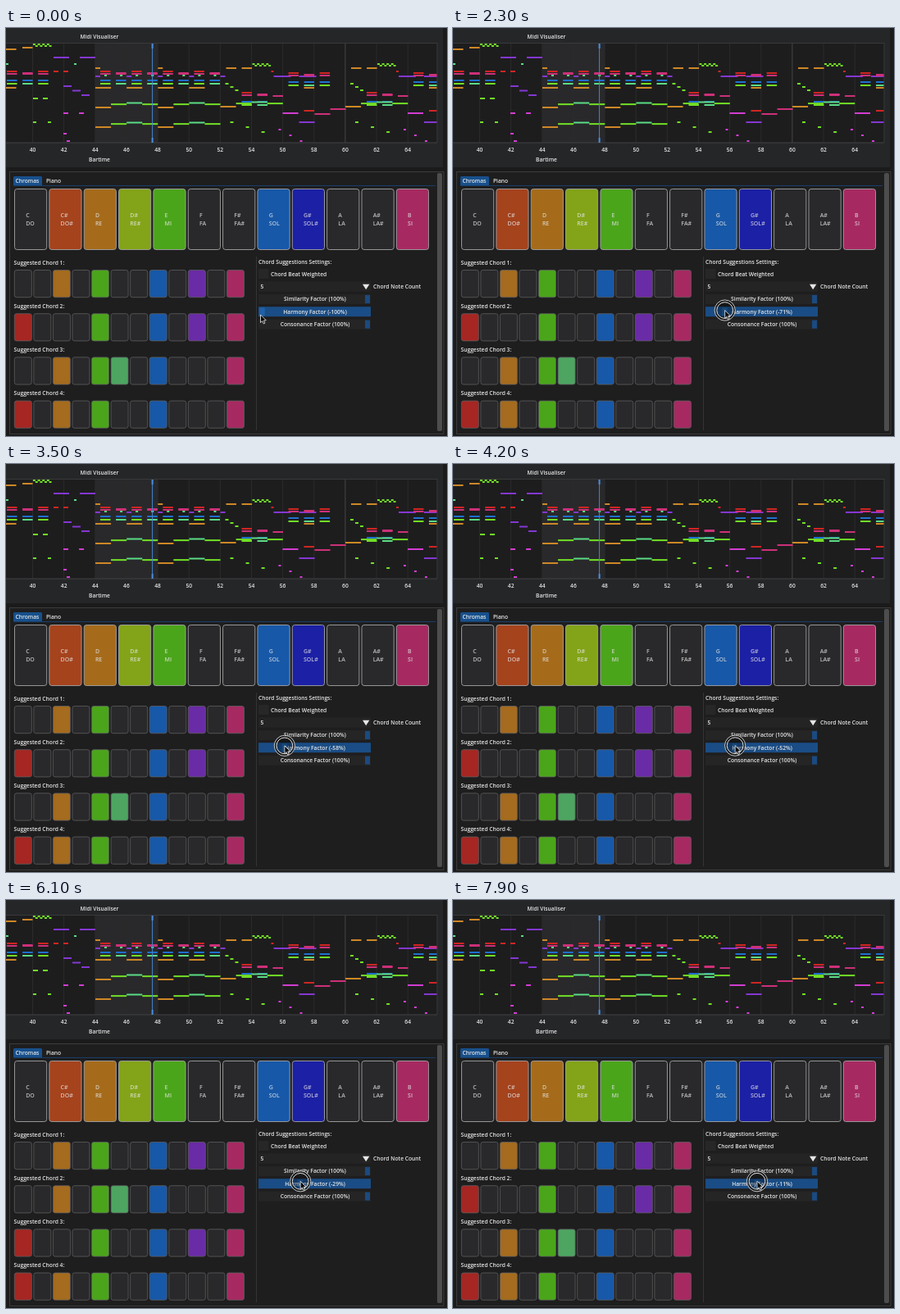
Recreate the animation shown at these times as an HTML page. Size 538 by 498 pixels, loop 8 s.

```html
<!DOCTYPE html>
<html lang="en">
<head>
<meta charset="utf-8">
<title>Chord suggestions</title>
<style>
html, body { margin: 0; width: 100%; height: 100%; overflow: hidden; background: #1b1b1c; }
svg { display: block; width: 100vw; height: 100vh; }
text { font: 600 6.7px "Open Sans", "Noto Sans", sans-serif; fill: #e6e6e6; white-space: pre; }
.key { font-size: 7px; fill-opacity: .78; }
.mid { text-anchor: middle; }
</style>
</head>
<body>
<svg id="stage" viewBox="0 0 538 498"></svg>
<script>
const C = {
  orange: '#ce8826', green: '#72df25', mint: '#5bdc86', purple: '#8437d2',
  pink: '#cd3078', blue: '#1e70cf', red: '#d02522', magenta: '#d23ed0'
};
const CARD = '#29292b';
const rect = (x, y, w, h, fill, more = '') =>
  `<rect x="${x}" y="${y}" width="${w}" height="${h}" fill="${fill}" ${more}/>`;
const text = (x, y, s, more = '') => `<text x="${x}" y="${y}" ${more}>${s}</text>`;
const mid = 'class="mid"';
const times = (n, fn) => Array.from({ length: n }, (_, i) => fn(i)).join('');

// Piano roll: notes come in runs, evenly spaced and rising or falling.
const BAR = 19.07;
const note = (color, x, y, w) => rect(x, y - 1, w, 2, C[color]);
const run = (color, x, y, n = 1, step = BAR, w = 12.5, rise = 0) =>
  times(n, i => note(color, x + i * step, y - i * rise, w));
const trill = (x, y) => times(8, i => note('green', x + i * 2.8, y + (i % 2 ? 1 : -1), 3));

const stack = (x, bars, drop = 0) => times(bars, i => {
  const left = x + i * BAR, accent = i % 2 === 0;
  return note(accent ? 'red' : 'pink', left, 55 + drop - (accent ? 2 : 0), 12.5) +
    note('pink', left, 56 + drop, 12.5) + note('blue', left, 64 + drop, 12.5) +
    note(accent ? 'green' : 'mint', left, 68 + drop, 12.5);
});
const bass = (x, y, bars) => times(bars, i => {
  const k = i % 4;
  return note(['orange', 'green', 'mint', 'green'][k], x + i * BAR, y - 5.5 * Math.sin(k * Math.PI / 4), BAR);
});

const intro = () => run('orange', 0, 26, 2, 20, 12.5, 2) + trill(33, 21) +
  run('purple', 58, 36, 2, 32, 19) + stack(1, 3) + run('orange', 0, 73) +
  run('red', 58, 53, 2, 12, 6) + run('purple', 70, 71, 3, 11, 10, -5.5) +
  run('mint', 0, 44, 2, 83, 3) + run('green', 33, 86, 2, 12, 6) + run('green', 33, 115, 2, 18, 4) +
  run('magenta', 70, 104, 2, BAR, 6) + run('magenta', 70, 129, 2, 4, 4, -9);

const verse = x => stack(x + 6, 8) + bass(x, 97, 8) + bass(x, 121, 8) +
  run('purple', x, 59, 5, 2 * BAR, 6) + run('orange', x, 73, 4, 2 * BAR, BAR) +
  run('orange', x, 49, 2, 4 * BAR, 6) + run('mint', x + 11, 58, 8, BAR, 3);

const chorus = x => run('orange', x + 7, 49, 2, BAR) + trill(x + 39, 45) +
  run('red', x + 62, 53, 1, BAR, 3) + run('purple', x + 65, 59, 2, 31, 21) +
  run('green', x + 6, 68, 3, 6, 4, -4) + stack(x + 26, 2, 26) + bass(x, 96, 4) +
  run('pink', x + 64, 83) + stack(x + 83, 3, 2) + run('orange', x + 102, 73) +
  run('magenta', x + 76, 104, 1, BAR, BAR) + run('red', x + 102, 101) +
  run('pink', x + 115, 105, 2, BAR, BAR, 6) + run('purple', x + 96, 115, 1, BAR, BAR) +
  run('green', x + 12, 115, 3, BAR, 4, -6) + run('magenta', x + 71, 124, 3, 13, 3, -7);

function visualiser() {
  const grid = times(13, i => {
    const x = 32.5 + i * 2 * BAR;
    return rect(x - .5, 18, 1, 122, i === 10 ? '#464647' : '#2b2b2c') + text(x, 150.8, 40 + 2 * i, mid);
  });
  return rect(0, 0, 533, 170, '#252628') + rect(0, 18, 526, 122, '#1d1d1e') +
    rect(109, 18, 76, 122, '#29292b') + grid +
    rect(0, 18, 526, 1, '#39393a') + rect(0, 139.5, 526, 1, '#434344') + rect(525.5, 18, 1, 122, '#39393a') +
    '<g clip-path="url(#plot)">' + intro() + verse(109) + chorus(261.5) + chorus(414) + '</g>' +
    rect(178.1, 19, 1, 121, '#4585cf') + times(2, i => rect(177.6, 19 + i * 115, 2, 6, '#4a8ee0')) +
    text(114, 13.1, 'Midi Visualiser', mid) + text(114, 163.2, 'Bartime', mid);
}

const chromas = [
  ['C', 'DO', CARD], ['C#', 'DO#', '#a5431d'], ['D', 'RE', '#a56b1b'], ['D#', 'RE#', '#83a418'],
  ['E', 'MI', '#4ba51b'], ['F', 'FA', CARD], ['F#', 'FA#', CARD], ['G', 'SOL', '#1758a8'],
  ['G#', 'SOL#', '#1c20a5'], ['A', 'LA', CARD], ['A#', 'LA#', CARD], ['B', 'SI', '#a62a61']
];
const cards = () => chromas.map(([key, name, fill], i) => {
  const x = 10.5 + i * 42.35;
  return rect(x, 196.5, 39.2, 74, fill, 'rx="3" stroke="#a3a3a4" stroke-width=".9"') +
    text(x + 13.7, 230.6, key, 'class="key"') + text(x + 13.7, 241.2, name, 'class="key"');
}).join('');

const cellFill = { C: '#a52622', D: '#a56b1e', E: '#4ba51b', F: '#4da561', G: '#1758a8', A: '#6a2ba6', B: '#a62a61' };
const chords = ['DEGAB', 'CEGAB', 'DEFGB', 'CDEGB'];
const chordRow = (chord, row) => chromas.map(([key], i) =>
  rect(10.3 + i * 23.56, 295.5 + row * 53.2, 21, 33.2, chord.includes(key) ? cellFill[key] : CARD,
    'rx="2.5" stroke="#5e5e60" stroke-width=".8"')).join('');
const chordRows = order => order.map((n, row) => chordRow(chords[n], row)).join('');

const slider = (y, label) => rect(308, y, 137, 12, '#252526') +
  text(377, y + 8.4, label, mid) + rect(438, y + 1, 6, 10, '#1a4a80');

function panel() {
  return rect(4.5, 175.5, 529.5, 320, '#1e1e1f', 'stroke="#3c3c3d"') +
    rect(526, 177, 6, 315, '#4d4d4e', 'rx="2"') +
    rect(9, 181, 35, 12, '#17508c', 'rx="1.5"') + rect(9, 192, 515, 1, '#193d66') +
    text(11.5, 189.3, 'Chromas') + text(49, 189.3, 'Piano') + cards() +
    times(4, i => text(9.5, 288.8 + i * 53.2, `Suggested Chord ${i + 1}:`)) +
    rect(305, 279, 1, 212, '#343435') +
    text(308, 287.7, 'Chord Suggestions Settings:') +
    rect(308, 294, 12.5, 12, '#272728') + text(323, 302.8, 'Chord Beat Weighted') +
    rect(308, 309.5, 137, 12, '#242425') + text(310.5, 318, '5') +
    '<path d="M435 312.8h8.4l-4.2 6.4z" fill="#e6e6e6"/>' + text(448, 318, 'Chord Note Count') +
    slider(325, 'Similarity Factor (100%)') + slider(355.7, 'Consonance Factor (100%)') +
    rect(308, 340.2, 137, 12, '#1a4d85');
}

const stage = document.getElementById('stage');
stage.innerHTML = '<clipPath id="plot"><rect y="18" width="525.5" height="122"/></clipPath>' +
  rect(0, 0, 538, 498, '#1b1b1c') + visualiser() + panel() +
  `<g id="usual">${chordRows([0, 1, 2, 3])}</g><g id="swapped">${chordRows([0, 2, 1, 3])}</g>` +
  rect(309, 341.2, 6.5, 10, '#2060a6', 'id="handle"') + text(377, 348.7, '', `id="factor" ${mid}`) +
  `<g id="pointer">
    <g id="ring" fill="none">
      <circle r="11.3" fill="#000" fill-opacity=".25" stroke="#111" stroke-opacity=".75" stroke-width="3"/>
      <circle r="12.6" stroke="#d8d8d8" stroke-width=".9"/>
      <circle r="9.9" stroke="#e4e4e4"/>
    </g>
    <path d="M0 0V9.6L2.2 7.7L3.8 11L5.4 10.2L3.9 7L6.8 6.8Z" fill="#080808" stroke="#f4f4f4" stroke-width=".8"/>
  </g>`;
const [usual, swapped, handle, factor, pointer, ring] =
  ['usual', 'swapped', 'handle', 'factor', 'pointer', 'ring'].map(id => document.getElementById(id));
const show = (part, on) => { part.style.display = on ? '' : 'none'; };

// time in ms, factor in percent
const PRESS = 400;
const drag = [[PRESS, -100], [1100, -91], [2300, -71], [2800, -65], [4200, -52], [6100, -29], [7900, -11]];
function factorAt(t) {
  if (t <= PRESS) return -100;
  const i = drag.findIndex(([time]) => time >= t);
  const [t0, v0] = drag[i - 1], [t1, v1] = drag[i];
  return v0 + (v1 - v0) * (t - t0) / (t1 - t0);
}

function draw(now) {
  const t = Math.floor(now % 8000 / 100) * 100;
  const value = factorAt(t);
  const moved = value + 100;
  const x = 312.5 + moved * .655;
  const pressed = t >= PRESS;
  handle.setAttribute('x', x - 3.25);
  factor.textContent = `Harmony Factor (${Math.round(value)}%)`;
  pointer.setAttribute('transform', `translate(${pressed ? x + .2 : 310.5} ${343.2 + 6.8 * Math.exp(-moved / 18)})`);
  show(ring, pressed);
  const swap = t >= 4500 && t < 7700;
  show(usual, !swap);
  show(swapped, swap);
}
const start = performance.now();
function tick() {
  draw(performance.now() - start);
  requestAnimationFrame(tick);
}
tick();
</script>
</body>
</html>
```
